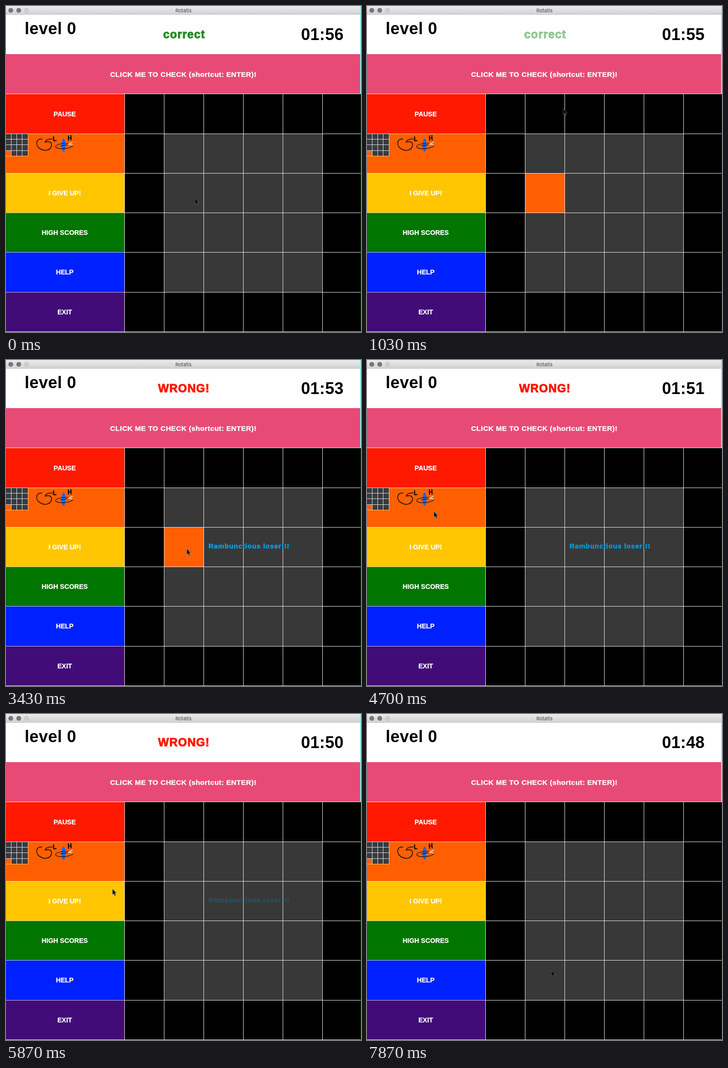
Animation of 780x718 px, one loop 8000 ms. Source, as an HTML page with a canvas:

```html
<!DOCTYPE html>
<html lang="en">
<head>
<meta charset="utf-8">
<title>Rotatis</title>
<style>
  html, body { margin: 0; height: 100%; overflow: hidden; background: #fff; }
  canvas { display: block; }
</style>
</head>
<body>
<canvas id="stage" width="780" height="718"></canvas>
<script>
const ctx = document.getElementById('stage').getContext('2d');
const LOOP = 8000;
const CELL_W = 87.1, CELL_H = 87.2, LEFT = 260, TOP = 194;
const ORANGE = '#ff5f00', GRID_LINE = '#f0f0f0';
const BUTTONS = [
  ['PAUSE', '#ff1900'], ['', ORANGE], ['I GIVE UP!', '#ffc600'],
  ['HIGH SCORES', '#007500'], ['HELP', '#0021ff'], ['EXIT', '#420c78']
];
// Event times in ms
const SELECT = 500, CHECK = 1680, DESELECT = 4060, CLEAR = 6170, FADE = 1600;
// Pointer waypoints: time, x, y
const POINTER = [
  [30, 415, 423], [500, 412, 412], [870, 415, 401], [1030, 431, 225],
  [1250, 436, 150], [3030, 436, 150], [3300, 395, 428], [3430, 397, 415],
  [3700, 400, 418], [4120, 400, 418], [4700, 147, 333], [5000, 112, 306],
  [5300, 140, 300], [5500, 152, 312], [5670, 152, 312], [6200, 406, 537],
  [6650, 407, 538], [6830, 406, 561], [7100, 406, 561], [7270, 406, 564],
  [7700, 406, 564], [7870, 405, 564]
];

const clamp = v => Math.max(0, Math.min(1, v));
const gridX = i => Math.floor(LEFT + i * CELL_W);
const gridY = i => Math.floor(TOP + i * CELL_H);

function rect(x, y, w, h, color) {
  ctx.fillStyle = color;
  ctx.fillRect(x, y, w, h);
}

function text(str, x, y, size, color, { align = 'center', spacing = 0, heavy = 0 } = {}) {
  ctx.font = `bold ${size}px "Liberation Sans", Arial, sans-serif`;
  ctx.textAlign = align;
  ctx.letterSpacing = spacing + 'px';
  ctx.fillStyle = ctx.strokeStyle = color;
  ctx.fillText(str, x, y);
  if (heavy) {
    ctx.lineWidth = heavy;
    ctx.strokeText(str, x, y);
  }
}

function faded(alpha, draw) {
  ctx.globalAlpha = clamp(alpha);
  draw();
  ctx.globalAlpha = 1;
}

function stroke(path, color, width) {
  ctx.strokeStyle = color;
  ctx.lineWidth = width;
  ctx.stroke(new Path2D(path));
}

function disc(x, y, rx, ry, fill, line) {
  ctx.beginPath();
  ctx.ellipse(x, y, rx, ry, 0, 0, Math.PI * 2);
  ctx.fillStyle = fill;
  ctx.fill();
  if (line) {
    ctx.strokeStyle = line;
    ctx.lineWidth = 1;
    ctx.stroke();
  }
}

function drawTitleBar() {
  const shade = ctx.createLinearGradient(0, 0, 0, 19);
  shade.addColorStop(0, '#ebebeb');
  shade.addColorStop(1, '#d1d1d1');
  rect(0, 0, 780, 19, shade);
  rect(0, 18, 780, 1, '#bdbdbd');
  disc(10.5, 9.5, 5.3, 5.3, '#777');
  disc(28, 9.5, 5.3, 5.3, '#777');
  disc(45, 9.5, 4.8, 4.8, '#d0d0d0', '#bababa');
  ctx.font = '11px Inter, Roboto, sans-serif';
  ctx.textAlign = 'center';
  ctx.letterSpacing = '0px';
  ctx.fillStyle = '#444';
  ctx.fillText('Rotatis', 390, 14);
}

function drawBoard(selected) {
  rect(0, 106, 778, 87, '#e84a76');
  text('CLICK ME TO CHECK (shortcut: ENTER)!', 389.5, 155.5, 15.5, '#fff', { spacing: .5, heavy: .4 });
  rect(LEFT, TOP, 520, 524, '#000');
  rect(gridX(1), gridY(1), gridX(5) - gridX(1), gridY(5) - gridY(1), '#383838');
  if (selected) rect(gridX(1), gridY(2), CELL_W, CELL_H, ORANGE);
  BUTTONS.forEach(([label, color], i) => {
    rect(0, gridY(i), LEFT, gridY(i + 1) - gridY(i), color);
    text(label, 129, gridY(i) + 48.5, 14.5, '#fff', { heavy: .3 });
  });
  for (let i = 0; i < 6; i++) rect(gridX(i), TOP, 1, 524, GRID_LINE);
  rect(0, TOP - 1, 780, 1, GRID_LINE);
  for (let i = 1; i < 7; i++) {
    rect(0, gridY(i), LEFT, 1, 'rgba(255,255,255,.75)');
    rect(LEFT, gridY(i), 520, 1, GRID_LINE);
  }
  rect(778, 0, 2, TOP, '#8ceeee');
  rect(779, TOP, 1, 524, '#064006');
}

function drawHint() {
  rect(0, 282, 48, 49, '#383b3e');
  rect(0, 319, 11, 12, ORANGE);
  for (let i = 0; i < 4; i++) {
    const color = i < 3 ? '#e4e4e4' : '#ffd080';
    rect(Math.round(10.5 + i * 12.4), 282, 1, 49, color);
    rect(0, Math.round(293 + i * 12.4), 48, 1, color);
  }
  ctx.save();
  ctx.lineCap = ctx.lineJoin = 'round';
  stroke('M79 293C66 291 64 306 73 313C84 321 98 319 100 307C101 300 95 297 86 300C87 295 93 292 102 293', '#16100a', 1.7);
  stroke('M104.500 288L105 297L110 296.500', '#000', 2.2);
  stroke('M137 286L137.500 296M142.500 285L143 295M137 291L143 290', '#000', 2.2);
  disc(126.5, 306.5, 4.3, 14.5, '#1268f5');
  stroke('M139 303C127 301 108 305 109 310C111 316 138 316 147 308M120 308L137 305', '#24170e', 1.4);
  stroke('M136 305L146 300M137 304L146 306', '#f4e8df', 1.4);
  ctx.restore();
}

function drawPointer(t) {
  let i = POINTER.findIndex(p => p[0] > t);
  if (i < 0) i = POINTER.length;
  const from = POINTER[Math.max(0, i - 1)];
  const to = POINTER[Math.min(i, POINTER.length - 1)];
  const k = clamp((t - from[0]) / (to[0] - from[0] || 1));
  const ease = k * k * (3 - 2 * k);
  ctx.save();
  ctx.translate(from[1] + (to[1] - from[1]) * ease, from[2] + (to[2] - from[2]) * ease);
  const arrow = new Path2D('M0 .5V14L3 11.200L5.200 16.200L7.500 15.200L5.400 10.300H9.200Z');
  ctx.fillStyle = '#0c0c0c';
  ctx.fill(arrow);
  ctx.strokeStyle = '#e4e4e4';
  ctx.stroke(arrow);
  ctx.restore();
}

function render(t) {
  rect(0, 0, 780, 718, '#fff');
  drawTitleBar();
  text('level 0', 41, 61.5, 36, '#000', { align: 'left', spacing: .5 });
  const seconds = 56 - Math.floor((t + 320) / 1000);
  text('01:' + seconds, 695, 74.5, 36, '#000', { spacing: .3 });

  const verdict = { spacing: 1.1, heavy: 1.1 };
  if (t < CHECK) {
    faded(1 - (t - 120) / FADE, () => text('correct', 391.5, 71, 25, '#228b22', verdict));
  } else if (t < CLEAR) {
    text('WRONG!', 391, 71, 25, '#ff1900', verdict);
  }

  drawBoard(t >= SELECT && t < DESELECT);
  drawHint();
  if (t >= CHECK && t < CLEAR) {
    faded((CLEAR - t) / FADE, () =>
      text('Rambunctious loser!!!', 445, 414.5, 15, '#00a4ef', { align: 'left', spacing: .9, heavy: .5 }));
  }
  drawPointer(t);
}

function tick() {
  render(performance.now() % LOOP);
  requestAnimationFrame(tick);
}
tick();
</script>
</body>
</html>
```
